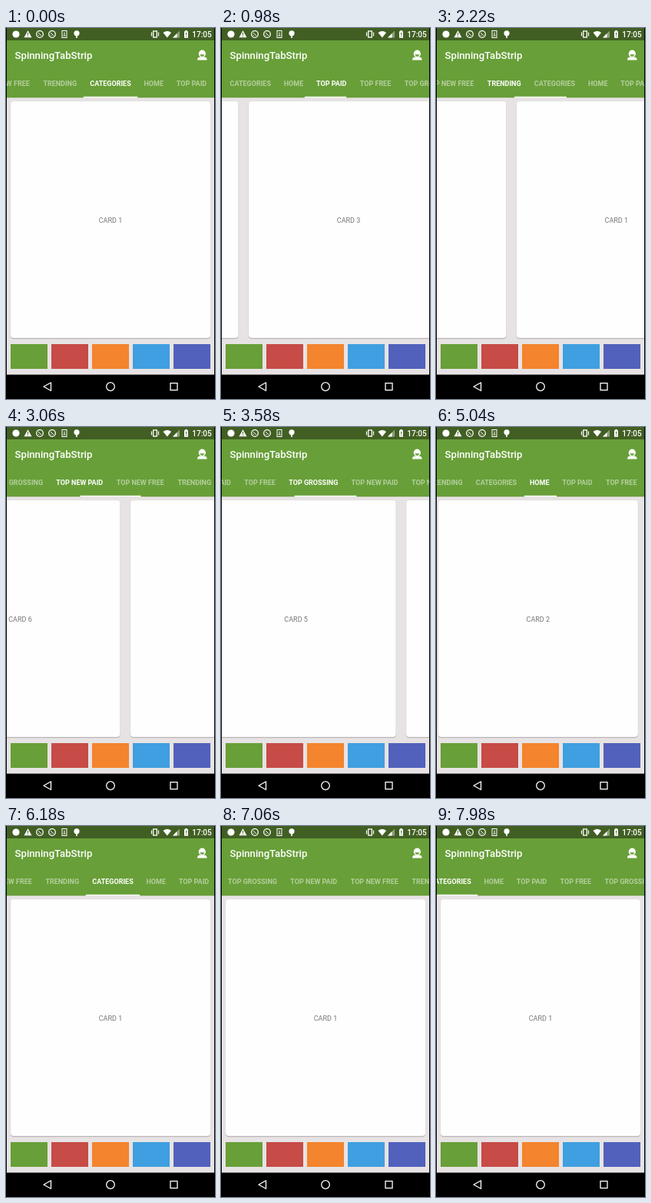
These frames come from a looping animation (272 by 480 pixels, 8000 ms). An HTML page:

```html
<!DOCTYPE html>
<html lang="en">
<head>
<meta charset="utf-8">
<title>SpinningTabStrip</title>
<style>
  html, body { margin: 0; width: 100%; height: 100%; overflow: hidden; background: #000; }
  svg { display: block; width: 272px; height: 480px; font-family: Roboto, "Open Sans", sans-serif; }
  .tab { font-size: 9px; font-weight: 700; fill: #fff; text-anchor: middle; }
  .label { font-size: 9px; fill: #757575; text-anchor: middle; }
  .line { fill: none; stroke: #fff; }
</style>
</head>
<body>
<svg viewBox="0 0 272 480">
  <rect width="272" height="480" fill="#e7e3e4"/>
  <g id="cards"></g>
  <g id="swatches"></g>

  <rect y="16" width="272" height="74" fill="#689f38"/>
  <rect width="272" height="16" fill="#415f23"/>
  <rect y="90" width="272" height="1" fill="#d3d2cb"/>
  <g id="tabs"></g>
  <rect id="bar" y="88.7" height="1.7" fill="#fff"/>
  <text x="11.5" y="40" font-size="13.2" font-weight="500" fill="#fff">SpinningTabStrip</text>

  <!-- contact button -->
  <g fill="#fff">
    <circle cx="255.3" cy="33.2" r="4.6"/>
    <path d="M249 41.5q0-4 4-4h4.600q4 0 4 4z"/>
    <path d="M252.300 34.300h6q-.6 2.700-3 2.700t-3-2.700z" fill="#689f38"/>
  </g>

  <!-- status bar -->
  <g fill="#fff">
    <circle cx="13" cy="8" r="4.6"/>
    <path d="M28.500 3.300l5 9h-10z"/>
    <path d="M28.500 6v3.300M28.500 10.200v1" stroke="#415f23"/>
    <g id="rings"></g>
    <rect class="line" x="73" y="3.500" width="6" height="9"/>
    <path class="line" d="M76 5.500v4M74.500 10h3"/>
    <circle cx="92" cy="6.800" r="3.600"/>
    <path d="M91.200 9h1.600v4h-1.600z"/>
    <rect class="line" x="191.700" y="4" width="4.600" height="8" stroke-width="1.300"/>
    <path class="line" d="M189.500 5.500v5M198.500 5.500v5" stroke-width="1.200"/>
    <path d="M204.500 6q5.300-4 10.600 0l-5.300 6.500z"/>
    <path d="M226 3.500v9h-9z" opacity=".4"/>
    <path d="M222.500 7v5.500h-5.500z"/>
    <path d="M232 4.300h1.300v-1.200h2.400v1.200h1.300v8.400h-5z"/>
    <path d="M234.500 6v3M234.500 10v1" stroke="#415f23"/>
    <text x="242.300" y="12" font-size="10" font-weight="500">17:05</text>
  </g>

  <!-- navigation bar and side edges -->
  <rect y="448.500" width="272" height="31.500"/>
  <g class="line" stroke-width="1.300">
    <path d="M58.500 458.700v10.600l-9.500-5.300z" stroke-linejoin="round"/>
    <circle cx="136" cy="464" r="5.300"/>
    <rect x="214" y="459.500" width="9" height="9"/>
  </g>
  <path d="M0 0h1v480h-1zM271 0h1v480h-1z"/>
</svg>
<script>
const LOOP = 8000, MID = 136, PITCH = 273.5;

// Tab titles with their text widths; each has 8px padding per side.
const TABS = [
  ["CATEGORIES", 54.5], ["HOME", 26], ["TOP PAID", 40.5], ["TOP FREE", 42],
  ["TOP GROSSING", 65.5], ["TOP NEW PAID", 62], ["TOP NEW FREE", 64], ["TRENDING", 45]
];

// Swipes: start, duration, destination page (pages wrap around).
const SWIPES = [
  [0, 640, 1], [649, 460, 2], [1190, 470, 1], [1790, 280, 0],
  [2072, 400, -1], [2472, 376, -2], [2848, 430, -3], [3283, 430, -4],
  [3713, 437, -5], [4150, 460, -6], [4610, 490, -7], [5100, 640, -8]
];

const $ = id => document.getElementById(id);
const mod = (a, n) => ((a % n) + n) % n;
const lerp = (a, b, f) => a + (b - a) * f;
const clamp = x => Math.min(1, Math.max(0, x));
const swipeEase = u => 1 - (1 - u * u) ** 3;

function add(parent, tag, attrs, text) {
  const el = document.createElementNS("http://www.w3.org/2000/svg", tag);
  for (const k in attrs) el.setAttribute(k, attrs[k]);
  if (text) el.textContent = text;
  return parent.appendChild(el);
}

let total = 0;
const tabs = TABS.map(([name, w]) => {
  const width = w + 16, center = total + width / 2;
  total += width;
  return { width, center, el: add($("tabs"), "text", { class: "tab", y: 74.7 }, name) };
});

const cards = [0, 1].map(() => {
  const g = add($("cards"), "g", {});
  const box = { x: 6, width: 260, height: 306, rx: 4 };
  add(g, "rect", { ...box, x: 5.5, y: 95.5, width: 261, height: 306.5, fill: "#d5d1d2" });
  add(g, "rect", { ...box, y: 96.2, fill: "#bcb8b9" });
  add(g, "rect", { ...box, y: 95, fill: "#fefefe" });
  return { g, label: add(g, "text", { class: "label", x: MID, y: 252 }) };
});

["#689f38", "#c74b46", "#f4842d", "#3f9fe0", "#5161bc"].forEach((fill, i) =>
  add($("swatches"), "rect", { x: 6 + 53 * i, y: 409, width: 48, height: 32, fill }));

for (const x of [44, 60]) {
  add($("rings"), "circle", { class: "line", cx: x, cy: 8, r: 4.3, "stroke-width": 1.3 });
  add($("rings"), "path", { class: "line", d: `M${x - 2} 6l4 4M${x - 1} 9.500h-1` });
}

function pager(t) {
  let page = 0, selected = 0;
  for (const [start, dur, to] of SWIPES) {
    if (t < start) break;
    const u = clamp((t - start) / dur);
    page = lerp(page, to, swipeEase(u));
    if (u > 0.3) selected = to;
  }
  return { page, selected };
}

// Free spin of the strip once the pages rest.
function spin(t) {
  const creep = 3 * clamp((t - 5900) / 280);
  const u = clamp((t - 6180) / 1800);
  return lerp(creep, total - 117, (1 - Math.cos(Math.PI * u)) / 2);
}

function drawCards(page) {
  const first = Math.floor(page);
  cards.forEach((card, i) => {
    const n = first + i;
    card.g.setAttribute("transform", `translate(${(n - page) * PITCH})`);
    card.label.textContent = "CARD " + (mod(n, 8) + 1);
  });
}

function drawStrip(page, selected, shift) {
  const i = Math.floor(page), f = page - i;
  const a = tabs[mod(i, 8)], b = tabs[mod(i + 1, 8)];
  const focus = a.center + f * (a.width + b.width) / 2;
  const place = c => MID + mod(c - focus + shift + total / 2, total) - total / 2;
  tabs.forEach((tab, k) => {
    tab.el.setAttribute("x", place(tab.center));
    tab.el.setAttribute("opacity", k === mod(selected, 8) ? 1 : 0.5);
  });
  const width = lerp(a.width, b.width, f);
  $("bar").setAttribute("x", place(focus) - width / 2);
  $("bar").setAttribute("width", width);
}

function draw() {
  const t = performance.now() % LOOP;
  const { page, selected } = pager(t);
  drawCards(page);
  // The strip follows the pages one step late.
  drawStrip(pager(Math.max(0, t - 20)).page, selected, spin(t));
  requestAnimationFrame(draw);
}
draw();
</script>
</body>
</html>
```
